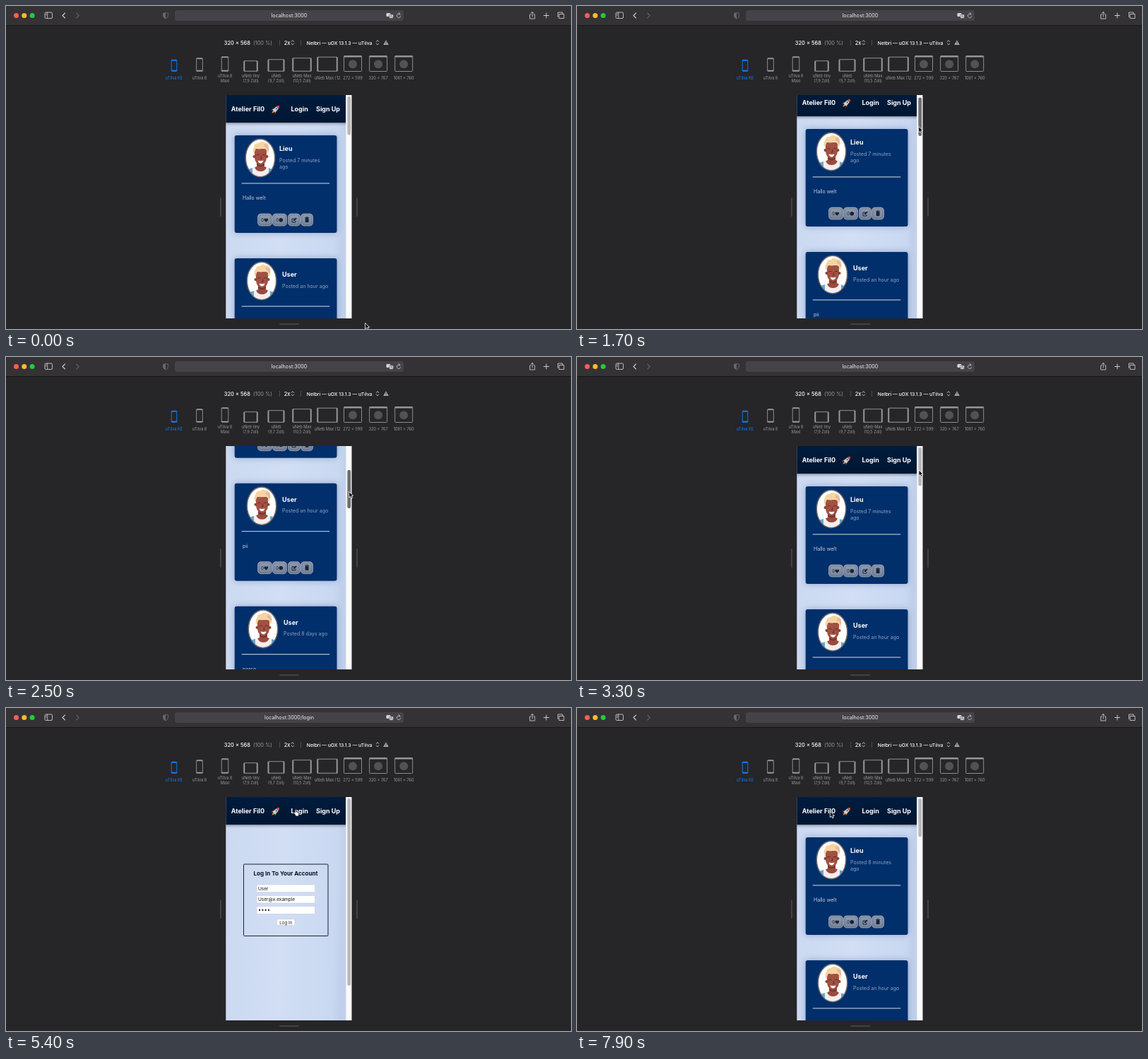
An HTML page for the animation above (8 s loop, 800x457 px).

```html
<!DOCTYPE html>
<html lang="en">
<head>
<meta charset="utf-8">
<title>Responsive preview</title>
<style>
  html, body { margin: 0; width: 100%; height: 100%; overflow: hidden; background: #262528; }
  svg { display: block; width: 100%; height: 100%; }
  text { font-family: Inter, Roboto, sans-serif; white-space: pre; }
  .card { filter: drop-shadow(0 0 5px #4a68a477); }
  .head { filter: drop-shadow(0 1px 2px #0007); }
  .line { fill: none; stroke: #c9c8cb; stroke-linecap: round; stroke-linejoin: round; }
</style>
</head>
<body>
<svg id="stage" viewBox="0 0 800 457" preserveAspectRatio="none"></svg>
<script>
const LOOP = 8000, STEP = 100;
const PAGE_TOP = 126, PAGE_HEIGHT = 316, CARD_PITCH = 174;

const text = (x, y, size, str, fill = '#fff', extra = '') =>
  `<text x="${x}" y="${y}" font-size="${size}" fill="${fill}" ${extra}>${str}</text>`;
const rect = (x, y, w, h, fill, r = 0, extra = '') =>
  `<rect x="${x}" y="${y}" width="${w}" height="${h}" rx="${r}" fill="${fill}" ${extra}/>`;
const line = (d, width = 1, extra = '') =>
  `<path class="line" d="${d}" stroke-width="${width}" ${extra}/>`;
const circle = (x, y, r, fill) => `<circle cx="${x}" cy="${y}" r="${r}" fill="${fill}"/>`;
const at = (x, y, body) => `<g transform="translate(${x} ${y})">${body}</g>`;
const BOLD = 'font-weight="700"', MEDIUM = 'font-weight="500"', MIDDLE = 'text-anchor="middle"';

const defs = `<defs>
  <linearGradient id="sky" x2="1" y2=".06">
    <stop offset="0" stop-color="#cbd9f1"/><stop offset=".5" stop-color="#d1def4"/>
    <stop offset=".94" stop-color="#c9d8f1"/><stop offset="1" stop-color="#c0d0ec"/>
  </linearGradient>
  <linearGradient id="navy" x2="0" y2="1">
    <stop stop-color="#001c3d"/><stop offset="1" stop-color="#001632"/>
  </linearGradient>
  <linearGradient id="key" x2="0" y2="1">
    <stop stop-color="#929dad"/><stop offset="1" stop-color="#748198"/>
  </linearGradient>
  <clipPath id="view"><rect x="311.300" y="126" width="169.700" height="316"/></clipPath>
  <clipPath id="oval"><ellipse rx="20.500" ry="26.500"/></clipPath>
  <clipPath id="label"><rect x="437" y="94" width="36.500" height="14"/></clipPath>
</defs>`;

function browserBar() {
  return rect(0, 0, 800, 27, '#343235') + rect(0, 27, 800, 1, '#171619') +
    ['#fe5f57', '#febc2e', '#28c840'].map((c, i) => circle(14.5 + 11.3 * i, 13.5, 3.5, c)).join('') +
    rect(55, 9, 10.5, 8.5, 'none', 1.5, 'stroke="#c9c8cb" stroke-width=".9"') +
    line('M58.7 9V17.5M56.3 11h1M56.3 13h1', .8) +
    line('M83.5 10l-3.5 3.5 3.5 3.5', 1.1) +
    line('M99.7 10l3.5 3.5-3.5 3.5', 1.1, 'opacity=".3"') +
    rect(239, 6, 324, 15, '#454347', 3.5) +
    line('M226 9.5l-3.5 1v3q0 3 3.5 4.5 3.5-1.5 3.5-4.5v-3z', .8, 'opacity=".4"') +
    '<path d="M226 9.5v8.5q-3.5-1.5-3.5-4.5v-3z" fill="#69676c"/>' +
    `<text id="url" x="401" y="16.300" font-size="7.200" fill="#f1f0f2" ${MIDDLE}></text>` +
    rect(538.5, 10, 6, 5, '#d8d7da', 1.3) + rect(542.5, 12, 6, 5.3, '#d8d7da', 1.3, 'stroke="#454347" stroke-width=".6"') +
    line('M544 15.8l1.5-2.6 1.5 2.6', .6, 'style="stroke:#454347"') +
    line('M558.5 12.2a2.8 2.8 0 1 0 .3 2.5M556 9.5l2 1.5-2 1.5', .8) +
    line('M743 12h-1.3v6h7v-6h-1.3M745.2 15V8.5M743.3 10.3l1.9-1.9 1.9 1.9', .9) +
    line('M761.5 13.5h7M765 10v7', 1) +
    line('M783.5 11.5h6.5v6h-6.5zM781.5 15.5V9h6.5v2', .9);
}

function chevrons(x) {
  return line(`M${x - 1.7} 50.5l1.7-1.9 1.7 1.9M${x - 1.7} 53l1.7 1.9 1.7-1.9`, .9);
}

function deviceBar() {
  const grey = '#98979a', blue = '#0a7ffa';
  const devices = [
    [238, 8.5, 17, ['uTilva KE']], [274, 9.5, 19.5, ['uTilva 8']], [310, 10.5, 21.5, ['uTilva 8', 'Maxi']],
    [346.5, 20.5, 15.5, ['uNeb tiny', '(7,9 Zoll)']], [382.5, 24, 17.5, ['uNeb', '(9,7 Zoll)']],
    [419, 27.5, 19.5, ['uNeb Max', '(10,5 Zoll)']], [455, 29.5, 21, []]
  ];
  const icons = devices.map(([x, w, h, names], i) => {
    const color = i ? grey : blue, left = x - w / 2, top = 92.7 - h, wide = w > h;
    const inner = wide ? [left + 2, top + 1, w - 4, h - 2] : [left + .9, top + 2, w - 1.8, h - 4];
    return rect(left, top, w, h, color, 1.5) + rect(...inner, '#262528') +
      names.map((n, k) => text(x, names.length > 1 ? 101 + 6.7 * k : 104, 5.6, n, color, MIDDLE)).join('');
  }).join('');
  const windows = ['272 × 599', '320 × 767', '1081 × 760'].map((size, i) => {
    const x = 491 + 36.1 * i;
    return rect(x - 12.5, 70.5, 25, 22, 'none', 1, `stroke="${grey}" stroke-width=".9"`) +
      rect(x - 12.5, 70.5, 25, 2, grey) + circle(x, 82.3, 6, '#525155') +
      text(x, 104, 5.7, size, grey, MIDDLE);
  }).join('');
  return text(308.8, 54.5, 7.5, '320 × 568', '#fff', MEDIUM) + text(350, 54.5, 7.4, '(100 %)', '#99979c') +
    rect(387, 48, .8, 8, '#59575c') + text(393.8, 54.5, 7.4, '2x', '#fff', MEDIUM) + chevrons(405.8) +
    rect(417, 48, .8, 8, '#59575c') +
    text(425.8, 54.5, 6.8, 'Nelbri — uOX 13.1.3 — uTilva', '#fff', MEDIUM) + chevrons(526) +
    '<path d="M538 48.300l3.800 6.700h-7.600z" fill="#aaa8ad"/>' +
    rect(537.6, 50.4, .8, 2.3, '#262528') + rect(537.6, 53.4, .8, .8, '#262528') +
    icons + text(437, 104, 5.6, 'uNeb Max (12,9 Zoll)', grey, 'clip-path="url(#label)"') + windows +
    [303, 496].map(x => rect(x, 271, 2, 27, '#434145', 1)).join('') + rect(387, 449, 28, 2, '#434145', 1);
}

function avatar(x, y) {
  return at(x, y, `<ellipse rx="20.500" ry="26.500" fill="#fff"/><g clip-path="url(#oval)">
    <path d="M-17 27q0-11 8-13l4-2V4h11v8l4 2q8 2 8 13z" fill="#9a4b3f"/>
    <path d="M-21 27v-7q4-5 10-6l2 13zM21 27v-7q-4-5-10-6l-2 13z" fill="#5eabdc"/>
    <path d="M-11 27V14l3-1q2 6 8.500 6T9 13l3 1v13z" fill="#f5eeee"/>
    <path d="M-5 7q6 4 11 0v3q-5 5-11 0z" fill="#7c362f"/>
    <path d="M-8-13H9V0Q8 9 .5 10-7 9-8 0z" fill="#a25142"/>
    <circle cx="-8.500" cy="-2" r="2" fill="#8b4137"/><circle cx="9.500" cy="-2" r="2" fill="#8b4137"/>
    <path d="M-8.500-5q-4-6 0-11 0-5 6-5 4-4 8-1 7 0 6.500 7 2 4-2 9l-1-5q-2-3-6-2.500-4 2-9 0-2 3-2.500 8.500z" fill="#f5d4a4"/>
    <path d="M6-20q7 1 6 8l-2 1q0-4-4-5z" fill="#e6b99e"/>
    <path d="M-5.500-4q2-1.500 4 0M3-4q2-1.500 4 0M1-3l1 4H0" fill="none" stroke="#4d2020" stroke-width=".8"/>
    <path d="M-3.500 3.500q4 1.500 8 0-1 4-4 4t-4-4z" fill="#fff"/>
    </g><ellipse rx="20.700" ry="26.700" fill="none" stroke="#746d6c" stroke-width="1.500"/>`);
}

function buttons(y) {
  const ink = '#14233d';
  const keys = [[356.5, 20], [377.5, 20], [399.5, 17], [417.5, 17]].map(([x, w]) =>
    rect(x, y, w, 17, 'url(#key)', 4.5, 'stroke="#a5afbd" stroke-width=".7"') +
    rect(x + 1.5, y + 1.5, w - 3, 14, 'none', 3.5, 'stroke="#59677f" stroke-width=".5"')).join('');
  return keys + text(361.2, y + 11, 5.8, '0', ink) + text(382.3, y + 11, 5.8, '0', ink) +
    at(368.3, y + 9, `<path d="M0 2.8L-2.8 0Q-3.3-2.3-1.5-2.5-.5-2.5 0-1.5.5-2.5 1.5-2.5 3.3-2.3 2.8 0z" fill="${ink}"/>`) +
    circle(389.3, y + 8.8, 2.8, ink) +
    at(408, y + 9, `<path d="M1-2h-4v5h5V1" fill="none" stroke="${ink}"/><path d="M-1 1V-.5L2.5-3.5 3.8-2.2.5 1z" fill="${ink}"/>`) +
    rect(423.7, y + 6, 4.8, 6, ink, .8) + rect(423, y + 4.8, 6.2, .9, ink) + rect(425, y + 4, 2.2, .8, ink);
}

function card(post, index) {
  const top = 183 + CARD_PITCH * index, first = index === 0;
  const nameX = post.x, nameY = top + (first ? 22 : 26);
  return `<g class="card">${rect(323.7, top, 144.8, 138, '#002f6b', 3)}</g>` +
    avatar(nameX - (first ? 27 : 29), top + 32) +
    text(nameX, nameY, 9, post.name, '#fff', BOLD) +
    post.when.map((w, i) => text(nameX, nameY + 15.6 + 9 * i, 7.1, w, '#8fa3c3', i || !first ? '' : 'id="when"')).join('') +
    rect(333.7, top + 67.3, 124.5, 1.2, '#b4bfd0') +
    text(335, top + 91.3, 7, post.body, '#c7d1e1') + buttons(top + 111);
}

const rocket = at(382, 146, `<g transform="rotate(45)">
  <path d="M-2 3L-4 6.500-3 1zM2 3L4 6.500 3 1z" fill="#d44a3c"/>
  <path d="M0-7Q3-4 2.500 4h-5Q-3-4 0-7z" fill="#c8d3dc"/><path d="M0-7q2 2 2.300 4h-4.600Q-2-5 0-7z" fill="#d44a3c"/>
  <circle cy="-1" r="1.200" fill="#2877a8"/><path d="M-1.500 4h3L0 8z" fill="#f4a62a"/></g>`);

const header = `<g class="head">${rect(309, PAGE_TOP, 175, 39, 'url(#navy)')}</g>` +
  text(318.8, 149.2, 9, 'Atelier Fil0', '#fff', BOLD) + rocket +
  text(403.5, 149.2, 9, 'Login', '#fff', BOLD) + text(439, 149.2, 9, 'Sign Up', '#fff', BOLD);

const posts = [
  { x: 387, name: 'Lieu', when: ['', 'ago'], body: 'Hallo welt' },
  { x: 391, name: 'User', when: ['Posted an hour ago'], body: 'pii' },
  { x: 393, name: 'User', when: ['Posted 8 days ago'], body: 'porco' }
];

const login = rect(336.5, 221, 119.5, 101.5, 'none', 1, 'stroke="#1b2230"') +
  text(396, 237.3, 8.1, 'Log In To Your Account', '#0b1220', `${BOLD} ${MIDDLE}`) +
  ['User', 'User@x.example', '••••'].map((value, i) =>
    rect(355, 250 + 15.3 * i, 82.5, 10.7, '#fff', 0, 'stroke="#bcc5d6" stroke-width=".5"') +
    text(357, 257.7 + 15.3 * i, i < 2 ? 6.5 : 7.5, value, '#111')).join('') +
  rect(383.5, 298.7, 25.5, 8.8, '#fff', 1.5, 'stroke="#b4bccb" stroke-width=".5"') +
  text(396.3, 305.5, 6.2, 'Log In', '#222', MIDDLE);

const arrow = '<path id="arrow" d="M0 0V8.300L2 6.500 3.500 9.500 5 8.800 3.600 5.900H6.200z" fill="#080808" stroke="#fff" stroke-width=".8"/>';
const hand = '<path id="hand" d="M1 6L-1 3.500Q0 2 1.300 3.500V-.5Q2.300-1.500 3 0V2.500Q4 2 4.400 3 5.500 2.500 6 3.800 7 3.500 7 5L6 8.500H2.500z" fill="#fff" stroke="#111" stroke-width=".7"/>';

document.getElementById('stage').innerHTML = defs + rect(0, 0, 800, 457, '#262528') +
  browserBar() + deviceBar() +
  rect(311.3, PAGE_TOP, 169.7, PAGE_HEIGHT, 'url(#sky)') +
  `<g clip-path="url(#view)"><g id="scroller"><g id="home">${posts.map(card).join('')}</g><g id="login">${login}</g>${header}</g></g>` +
  rect(481, PAGE_TOP, 8.5, PAGE_HEIGHT, '#fafafa') + rect(481, PAGE_TOP, .6, PAGE_HEIGHT, '#dedee1') +
  '<rect id="thumb" x="483.300" width="4.800" rx="2.400"/>' +
  `<g id="cursor">${arrow}${hand}</g>`;

// Rows: time, then values. The scrollbar is dragged down and straight back up.
const cursorPath = [
  [0, 508.5, 448.5], [200, 508.5, 448.5], [1000, 484, 176], [1600, 483.7, 169], [1700, 483.7, 170.5],
  [2000, 483.7, 197.5], [2250, 485, 213], [2500, 485.7, 190.5], [2800, 485, 161], [3300, 484, 160],
  [3800, 480, 158], [4300, 357, 124.5], [4700, 357, 124.5], [5100, 408, 144.5], [5700, 408, 144.5],
  [6300, 455, 145], [6900, 455, 145], [7400, 358.3, 146.5], [8000, 358.3, 146.5]
];
const scrollPath = [[0, 0], [1600, 0], [1700, 9], [2000, 169], [2250, 250], [2500, 178.3], [2800, 0], [8000, 0]];

function sample(path, time) {
  const i = Math.max(1, path.findIndex(row => row[0] >= time));
  const [from, to] = [path[i - 1], path[i]];
  const progress = (time - from[0]) / (to[0] - from[0]);
  return from.slice(1).map((v, k) => v + (to[k + 1] - v) * progress);
}

const $ = id => document.getElementById(id);
const show = (id, on) => $(id).setAttribute('display', on ? 'inline' : 'none');

function draw(now) {
  const time = Math.floor((now % LOOP) / STEP) * STEP;
  const onLogin = time >= 5200 && time < 7600;
  const dragging = time >= 1400 && time < 3300;
  const [x, y] = sample(cursorPath, time);
  const [scroll] = sample(scrollPath, time);

  $('url').textContent = 'localhost:3000' + (onLogin ? '/login' : '');
  $('when').textContent = `Posted ${time < 7600 ? 7 : 8} minutes`;
  show('home', !onLogin);
  show('login', onLogin);
  $('scroller').setAttribute('transform', `translate(0 ${-scroll})`);

  $('thumb').setAttribute('y', 128 + scroll * .178);
  $('thumb').setAttribute('height', onLogin ? 265 : 54.5);
  $('thumb').setAttribute('fill', dragging ? '#6e6d70' : '#b9b9bb');

  const overLink = time >= 5000 && time < 7200;
  show('arrow', !overLink);
  show('hand', overLink);
  $('cursor').setAttribute('transform', `translate(${x} ${y})`);
  requestAnimationFrame(() => draw(performance.now() - start));
}
const start = performance.now();
draw(0);
</script>
</body>
</html>
```
